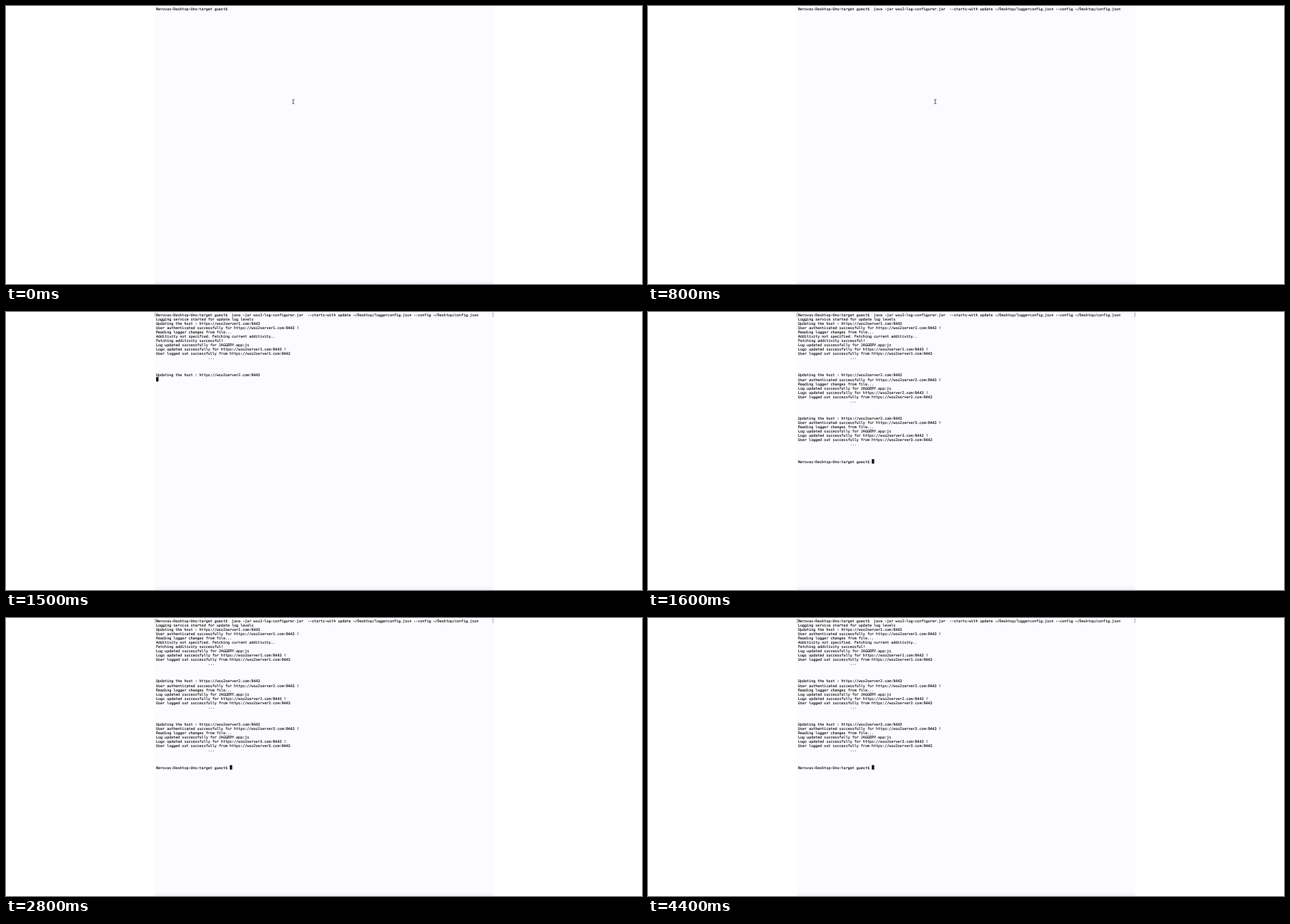
These frames come from a looping animation (890x390 px, 4.5 s). An HTML page:

```html
<!DOCTYPE html>
<html lang="en">
<head>
<meta charset="utf-8">
<title>Terminal session</title>
<style>
  html, body { margin: 0; width: 100%; height: 100%; overflow: hidden; background: #fff; }
  svg { display: block; }
  text {
    font: 5.04px "DejaVu Sans Mono", monospace;
    white-space: pre;
    text-rendering: geometricPrecision;
    fill: #000;
    stroke: #000;
    stroke-width: .1;
  }
</style>
</head>
<body>
<svg width="890" height="390" viewBox="0 0 890 390">
  <defs>
    <linearGradient id="edge" x2="0" y2="1">
      <stop offset="0" stop-color="#fcfbff"/>
      <stop offset="1" stop-color="#f3eff5"/>
    </linearGradient>
  </defs>
  <rect x="208" width="474" height="390" fill="#fcfbff"/>
  <rect x="208" y="384" width="474" height="6" fill="url(#edge)"/>
  <g id="lines"></g>
  <path id="marks" d="M209.7 1.4H208.6V6.6H209.7M680.4 1.4H681.5V6.6H680.4" fill="none" stroke="#777" stroke-width=".6"/>
  <path id="pointer" d="M400.4 131.2Q402 131.2 402 132.2Q402 131.2 403.6 131.2M402 132V136.4M400.4 137.2Q402 137.2 402 136.2Q402 137.2 403.6 137.2" fill="none" stroke="#333" stroke-width=".8"/>
  <rect id="cursor" width="3.4" height="6.2" fill="#111"/>
</svg>
<script>
const LOOP = 4500;
const LEFT = 210, COLUMN = 3.034, ROW = 6.06;
const byId = id => document.getElementById(id);

const prompt = "Nerovas-Desktop-Uno:target guest$ ";
const command = " java -jar wso2-log-configurer.jar  --starts-with update ~/Desktop/loggerconfig.json --config ~/Desktop/config.json";

function hostLog(number, extra = []) {
  const host = `https://wso2server${number}.com:9443`;
  return [
    `Updating the host : ${host}`,
    `User authenticated successfully for ${host} !`,
    "Reading logger changes from file...",
    ...extra,
    "Log updated successfully for JAGGERY.app:js",
    `Logs updated successfully for ${host} !`,
    `User logged out successfully from ${host}`,
    " ".repeat(24) + "...",
    "", "", ""
  ];
}

const rows = [
  prompt,
  "Logging service started for update log levels",
  ...hostLog(1, [
    "Additivity not specified. Fetching current additivity..",
    "Fetching additivity successful!"
  ]),
  ...hostLog(2),
  ...hostLog(3),
  prompt
];

const lines = rows.map((content, row) => {
  const line = document.createElementNS("http://www.w3.org/2000/svg", "text");
  line.setAttribute("x", LEFT);
  line.setAttribute("y", 5.6 + row * ROW);
  line.textContent = content;
  byId("lines").append(line);
  return line;
});

// Each stage: start time, visible rows, cursor row, cursor column.
const stages = [
  [0, 1, 0, prompt.length],
  [200, 1, 0, prompt.length + command.length],
  [900, 1, 1, 0],
  [1100, 3, 3, 0],
  [1500, 15, 15, 0],
  [1600, rows.length, rows.length - 1, prompt.length]
];

// The cursor starts hidden and flips at each of these times.
const blinks = [100, 800, 900, 2100, 2300, 2500, 2800, 3000, 3200, 3400, 3600, 3900, 4100, 4300, 4400];

const show = (node, on) => node.setAttribute("visibility", on ? "visible" : "hidden");

function render(time) {
  const [, count, row, column] = stages.findLast(([start]) => time >= start);
  lines.forEach((line, i) => show(line, i < count));
  lines[0].textContent = time < 200 ? prompt : prompt + command;
  show(byId("marks"), time >= 900);
  show(byId("pointer"), time < 900);

  const cursor = byId("cursor");
  cursor.setAttribute("x", LEFT + column * COLUMN);
  cursor.setAttribute("y", .4 + row * ROW);
  show(cursor, blinks.filter(flip => time >= flip).length % 2 === 1);
}

const begin = performance.now();
function tick() {
  render((performance.now() - begin) % LOOP);
  requestAnimationFrame(tick);
}
tick();
</script>
</body>
</html>
```
